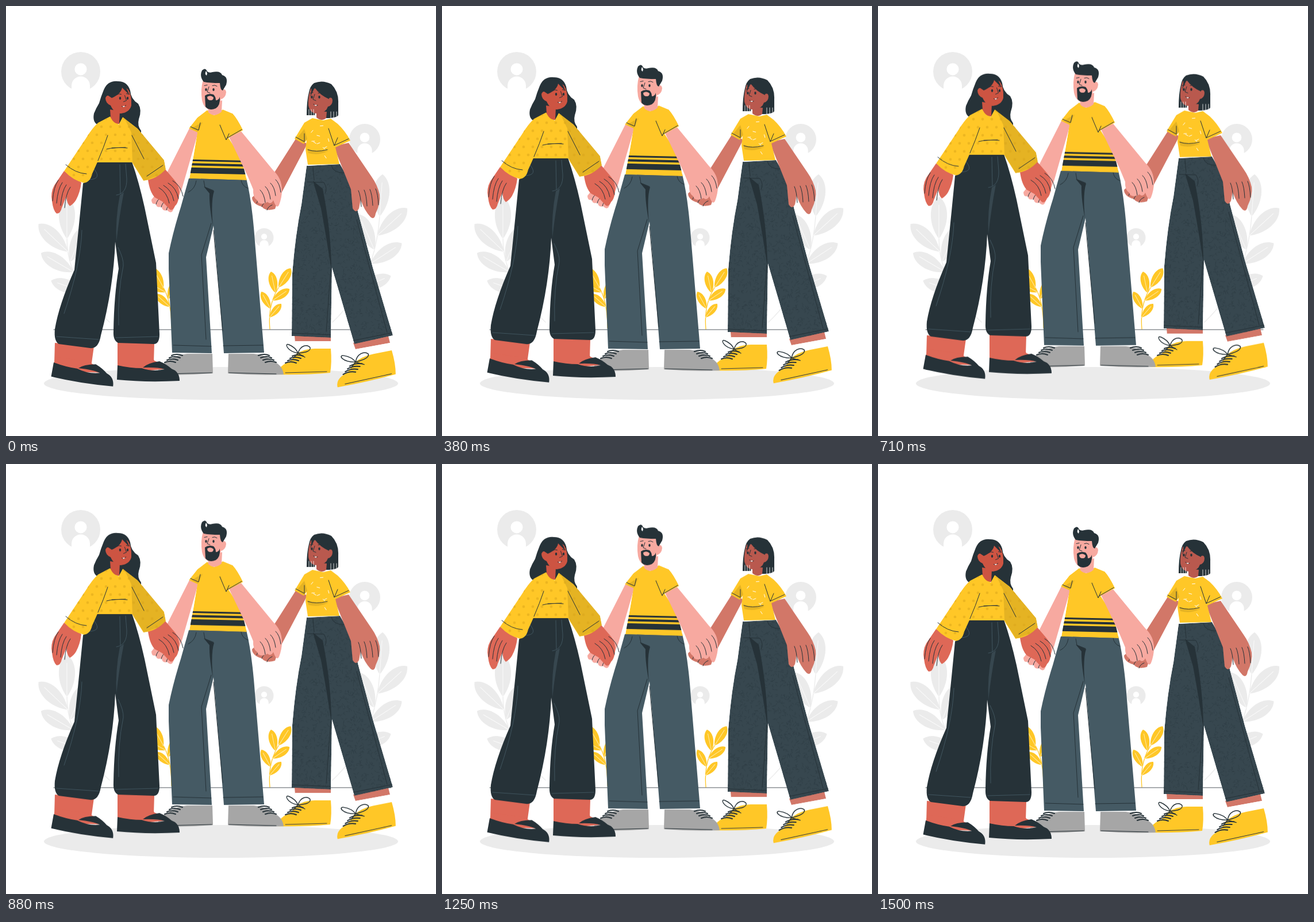
An HTML page that plays this animation: 748 by 748 pixels, repeating every 1540 ms.

```html
<!DOCTYPE html>
<html lang="en">
<head>
<meta charset="utf-8">
<title>Three friends</title>
<style>
html, body { margin: 0; width: 100%; height: 100%; overflow: hidden; background: #fff }
svg { display: block; width: 100vw; height: 100vh }
.line { fill: none; stroke-linecap: round; stroke-linejoin: round }
</style>
</head>
<body>
<svg viewBox="0 0 748 748"><g id="back"></g><g id="people"></g></svg>
<script>
const INK = '#263238', SUN = '#ffc727', PALE = '#ebebeb', SLATE = '#455a64', DENIM = '#37474f',
  RED = '#de6857', PINK = '#f7a9a0', CLAY = '#d27768';

const fill = (color, d) => `<path fill="${color}" d="${d}"/>`;
const line = (d, width = 1, color = INK) => `<path class="line" stroke="${color}" stroke-width="${width}" d="${d}"/>`;
const place = (transform, body) => `<g transform="${transform}">${body}</g>`;
const clip = (id, d, color, body) =>
  `<clipPath id="${id}"><path d="${d}"/></clipPath><g clip-path="url(#${id})">${fill(color, d)}${body}</g>`;
const repeat = (n, f) => Array.from({ length: n }, (_, i) => f(i)).join('');
const shade = d => `<g opacity=".1">${fill('#000', d)}</g>`;

let seed = 7;
const rand = () => (seed = seed * 16807 % 2147483647) / 2147483647;
const ticks = (n, x, y, w, h, len) => repeat(n, () => {
  const a = rand() * 6.3;
  return `M${x + rand() * w} ${y + rand() * h}l${Math.cos(a) * len} ${Math.sin(a) * len}`;
});

// Scenery

const badge = (x, y, r) => place(`translate(${x} ${y}) scale(${r})`,
  `<circle r="1" fill="${PALE}"/><circle cy="-.12" r=".31" fill="#fff"/>` +
  fill('#fff', 'M-.47 1.1V.72a.47.47 0 0 1 .94 0V1.1Z'));

const leaf = (x, y, angle, len, color, vein) => place(`translate(${x} ${y}) rotate(${angle}) scale(${len})`,
  fill(color, 'M0 0C.3 -.23 .8 -.28 1 0C.8 .28 .3 .23 0 0Z') + line('M0 0L.8 0', 1 / len, vein));

// Leaves alternate along a quadratic stem and one ends it.
function plant([x0, y0], [cx, cy], [x1, y1], n, side, len, color, vein) {
  const leafAt = (t, turn) => {
    const mix = (a, b, c) => a * (1 - t) ** 2 + 2 * b * t * (1 - t) + c * t * t;
    const slope = (a, b, c) => (1 - t) * (b - a) + t * (c - b);
    const angle = Math.atan2(slope(y0, cy, y1), slope(x0, cx, x1)) * 180 / Math.PI;
    return leaf(mix(x0, cx, x1), mix(y0, cy, y1), angle + turn, len * (.75 + .3 * t), color, vein);
  };
  return line(`M${x0} ${y0}Q${cx} ${cy} ${x1} ${y1}`, 1.3, color) +
    repeat(n, i => leafAt(.25 + .6 * i / (n - 1), side * (i % 2 ? -38 : 38))) + leafAt(1, 0);
}
const greyPlant = (a, b, c, side) => plant(a, b, c, 6, side, 70, PALE, '#fafafa');
const sunPlant = (a, b, c) => plant(a, b, c, 4, 1, 38, SUN, '#ffe9a6');

document.getElementById('back').innerHTML =
  `<ellipse cx="374" cy="656.5" rx="308" ry="28.5" fill="${PALE}"/>` +
  badge(130, 114, 34) + badge(624, 232, 27) + badge(449, 403, 16.5) +
  greyPlant([180, 550], [106, 480], [106, 405], 1) +
  greyPlant([568, 550], [642, 480], [650, 366], -1) +
  sunPlant([459, 562], [455, 520], [474, 490]) +
  sunPlant([288, 560], [288, 515], [274, 490]) +
  line('M83 563H670', .8);

// Parts shared by the people

const eye = x => `<ellipse cx="${x}" rx="1.700" ry="2.400" fill="${INK}"/>`;
const features = (x, y, dir) => place(`translate(${x} ${y}) scale(${dir} 1)`,
  eye(-6) + eye(7) + line('M2 -5L5 4L0 6M-12 -6Q-8 -9 -4 -7M5 -8L10 -7M-3 14Q2 16 4 12') +
  fill('#fff', 'M-2 13.500h5l-3 2Z'));

// Curved finger lines, each a step from the last.
const fingers = (x, y, dx, dy, bend, len, n = 4) =>
  line(repeat(n, i => `M${x + i * dx} ${y + i * dy}q${bend * .8} ${len * .3} ${bend} ${len}`));
const laces = (x, y, n = 4) => line(repeat(n, i => `M${x - 4 * i} ${y + 4 * i}q9 -4 19 0`), 2);
const bow = line('M0 0C-20 -4 -24 -18 -16 -15Q-4 -10 0 0C4 -14 16 -16 21 -10C23 -2 8 -1 0 0l12 7M0 0l-8 8', 1.4);

const sneaker = fill(SUN, 'M0 0Q2 24 -1 42Q-45 46 -91 45Q-92 34 -81 27Q-69 23 -61 10Q-47 0 -28 0Z') +
  line('M-79 42L-7 40', .9) + place('translate(-57 8)', bow) + laces(-67, 13);
const trainer = fill('#a6a6a6', 'M315 605H359L360 639Q310 643 263 641Q265 624 282 618Q297 606 315 605Z') +
  line('M276 640L358 638') + laces(288, 608);
const flat = fill(RED, 'M2 -10H63L64 -8Q78 -3 84 6L30 12L0 4Z') +
  fill(INK, 'M0 0Q22 5 42 5Q62 12 82 7Q70 3 44 4Q52 -4 73 -7Q85 -2 94 6Q108 11 108 27Q50 30 -1 25Z');

// People, back to front

const girl =
  fill(CLAY, 'M506 228L464 294L440 322L428 333Q428 344 445 349Q452 358 468 353L474 335L524 240Z') +
  fingers(445, 334, 9, 6, -9, 9, 3) +
  fill(CLAY, 'M502 574H565V585H503ZM604 586L665 574L668 586L608 597Z') +
  fill('#fff', 'M503 583H565V599H503ZM608 597L668 586V601L611 607Z') +
  place('translate(565 596)', sneaker) +
  place('translate(671 599) rotate(-11) scale(1.150 1)', sneaker) +
  clip('jeans', 'M523 278L581 275L598 305L638 455L673 573L606 588L567 455L565 577L497 574L498 465Q503 400 514 345Z', DENIM,
    `<g opacity=".3">${line(ticks(1800, 495, 276, 180, 312, 3.5))}</g>` +
    fill(INK, 'M534 304L551 318Q566 395 566 460Q557 400 548 352Z') +
    line('M524 306L553 307Q560 318 555 326M534 280L536 303M566 278Q570 292 591 290M497 569L566 572M604 582L674 568M610 372L663 568M565 458L557 566')) +
  fill(CLAY, 'M570 244L600 319L603 352Q609 362 614 352L617 337Q623 355 634 367Q641 373 643 361Q652 342 650 328Q646 311 636 297L596 238Z') +
  fingers(613, 321, 10, -1, 5, 28) +
  fill(SUN, 'M533 195L519 203L502 231L518 240L523 233L521 249L525 276L580 275L573 246L599 234Q590 217 577 205L565 196L552 199Z') +
  shade('M519 214L506 230L518 239L524 231ZM524 248Q537 254 561 252Q543 261 526 256Z') +
  line(ticks(10, 528, 205, 40, 62, 5), 1, '#fff') +
  line('M504 228L519 236V222M572 242L596 231M561 213L571 243L577 229M525 250Q539 255 559 250') +
  fill('#b9594e', 'M540 180V194Q550 202 558 194V174Z') +
  fill(INK, 'M536 134Q551 128 566 136Q579 149 578 169V190Q575 195 557 195L558 184L538 182L537 190H523Q523 165 527 150Q529 139 536 134Z') +
  fill('#b9594e', 'M530 144Q525 158 526 173Q529 188 543 187Q557 185 560 175Q568 173 568 164Q567 157 561 161L551 142Z') +
  fill(INK, 'M531 149Q530 138 540 136Q560 137 562 162Q546 155 537 142L529 158Z') +
  line(repeat(3, i => `M${527 + i * 4} 180v12M${565 + i * 5} 184v11`), .8, '#fff') +
  features(539, 158.5, -1);

let bandY = 267;
const bands = [3, 4, 10].map(w => {
  const d = `M310 ${bandY + w / 2 - .5}L420 ${bandY + w / 2 + 2}`;
  bandY += w + 3.5;
  return line(d, w);
}).join('');

const man =
  fill(PINK, 'M319 213L283 284L264 323L253 337Q253 346 261 344Q261 352 271 349Q272 358 280 355Q289 364 292 351L306 318L335 217Z') +
  fingers(270, 333, 9, 5, -9, 12, 3) +
  trainer + place('translate(746 0) scale(-1 1)', trainer) +
  fill(SLATE, 'M318 300H418Q428 340 433 410L449 603L379 604Q371 500 361 382L348 437L358 604L289 603L283 458V430Q291 391 304 350Z') +
  fill(INK, 'M344 314L362 322Q356 340 360 383Q353 345 354 326Z') +
  line('M344 304L346 315L361 321M317 324Q329 318 331 304M409 303Q411 314 421 317M357 378L340 433L348 580M361 390Q367 460 377 565M291 590L357 592M378 591L447 590') +
  clip('tee', 'M350 181L333 194L318 213L333 220L326 262L319 300L419 303L409 264L387 229L412 216Q403 197 394 187L377 180L362 190Z', SUN, bands) +
  shade('M333 207L322 213L334 219L342 202ZM372 205L384 229L390 221Z') +
  fill(PINK, 'M387 226L409 218L465 286Q480 300 480 320Q480 333 475 346Q471 355 465 338Q461 346 455 341Q440 348 437 338Q429 333 430 319L420 295Z') +
  fill(SUN, 'M374 207L382 232L412 216Q403 197 394 187Z') +
  line('M321 210L335 216L338 203M372 207L383 233L388 222M384 230L410 215') +
  fingers(442, 320, 9, -6, 9, 22) +
  fill(PINK, 'M351 174L352 185Q362 195 375 184L376 164Z') +
  fill(PINK, 'M343 128Q338 145 341 164Q345 181 358 180Q370 178 374 162Q382 160 383 150Q382 143 376 146L370 126Z') +
  fill(INK, 'M344 132Q336 122 341 112Q347 106 350 114Q354 117 359 115Q373 112 376 120Q387 123 383 137L377 147Q373 147 372 134Q355 134 344 132Z') +
  fill('#fff', 'M348 113Q345 118 349 121L350 117Z') +
  features(355, 145.5, -1) +
  fill(INK, 'M346 156Q352 151 361 154Q365 158 365 164Q370 164 372 158Q373 173 365 178Q353 183 347 175Z') +
  fill(PINK, 'M350 158Q356 154 361 159Q361 164 356 164Q350 164 350 158Z');

const dots = repeat(108, i => {
  const row = Math.floor(i / 12), x = 94 + i % 12 * 16 + row % 2 * 8;
  return `<circle cx="${x}" cy="${196 + row * 14}" r="2.300"/>`;
});

const woman =
  fill(INK, 'M170 146Q177 129 195 131Q211 131 216 147Q217 162 230 170Q237 181 231 197Q228 208 235 217V229Q219 223 208 209L177 199Q172 210 160 207Q150 202 153 187Q157 177 162 169Q165 158 170 146Z') +
  fill(RED, 'M85 586L153 592L148 628L84 622ZM194 584L258 586L257 620L194 630Z') +
  place('translate(83 620) rotate(8)', flat) + place('translate(194 625)', flat) +
  fill(INK, 'M158 271H219Q231 305 241 350L261 447L267 571Q267 588 257 588L195 586Q186 582 187 565Q188 503 196 457L190 410Q187 490 165 573Q161 597 146 595L92 588Q83 583 85 562Q92 520 119 459L128 370L134 309Z') +
  line('M208 275L210 300Q211 326 192 329M198 276L199 326M195 420Q205 440 204 452Q194 500 196 555M150 280Q170 301 145 302M132 390Q130 450 101 535M88 575L161 580M191 577L264 575', .9, SLATE) +
  fill(DENIM, 'M198 329L205 324Q197 365 192 411Q190 370 198 329Z') +
  fill(RED, 'M101 287L84 312Q77 325 80 339Q82 356 88 361Q95 361 97 351L105 331Q106 344 111 348Q118 344 122 337Q129 324 131 307Z') +
  fingers(91, 303, 7, 4, -10, 36) +
  fill(RED, 'M247 302L277 284L294 304Q303 315 301 331Q299 344 294 348Q290 357 285 354L272 340L259 333Q250 324 247 302Z') +
  fingers(266, 316, 8, -4, 18, 27) +
  clip('blouse', 'M181 192L160 203Q150 212 139 230L101 287Q117 304 136 308Q147 306 150 292L159 272H219L239 304Q262 302 278 284L275 268L229 213L203 193L196 206Z', SUN,
    shade('M205 193L218 220L220 272L240 304L280 290L275 268L230 212Z') +
    `<g fill="#d9a51c" opacity=".5">${dots}</g>`) +
  line('M177 225Q170 246 160 269M175 249Q190 245 211 247M184 247L208 246M104 276Q121 291 140 292M245 296L273 277M219 225L240 266') +
  fill('#cd5442', 'M181 180L182 194Q188 206 197 205L198 183Z') +
  fill('#cd5442', 'M183 144L184 159Q176 152 173 160Q173 169 182 173Q188 187 200 187Q215 185 218 173Q219 154 212 145Q198 135 183 144Z') +
  fill(INK, 'M175 154Q176 135 194 135Q210 137 214 154Q206 146 202 142Q200 153 184 160Z') +
  features(204.5, 160.5, 1);

const people = document.getElementById('people');
people.innerHTML = girl + man + woman;

// The group rises and sinks evenly, held 24 times a second.
const FRAMES = 37, PEAK = 17.5, RISE = 13.6;
people.animate(Array.from({ length: FRAMES + 1 }, (_, k) => ({
  transform: `translateY(${-RISE * Math.max(0, 1 - Math.abs(k / PEAK - 1))}px)`,
  easing: 'step-end'
})), { duration: 1540, delay: -4, iterations: Infinity });
</script>
</body>
</html>
```
